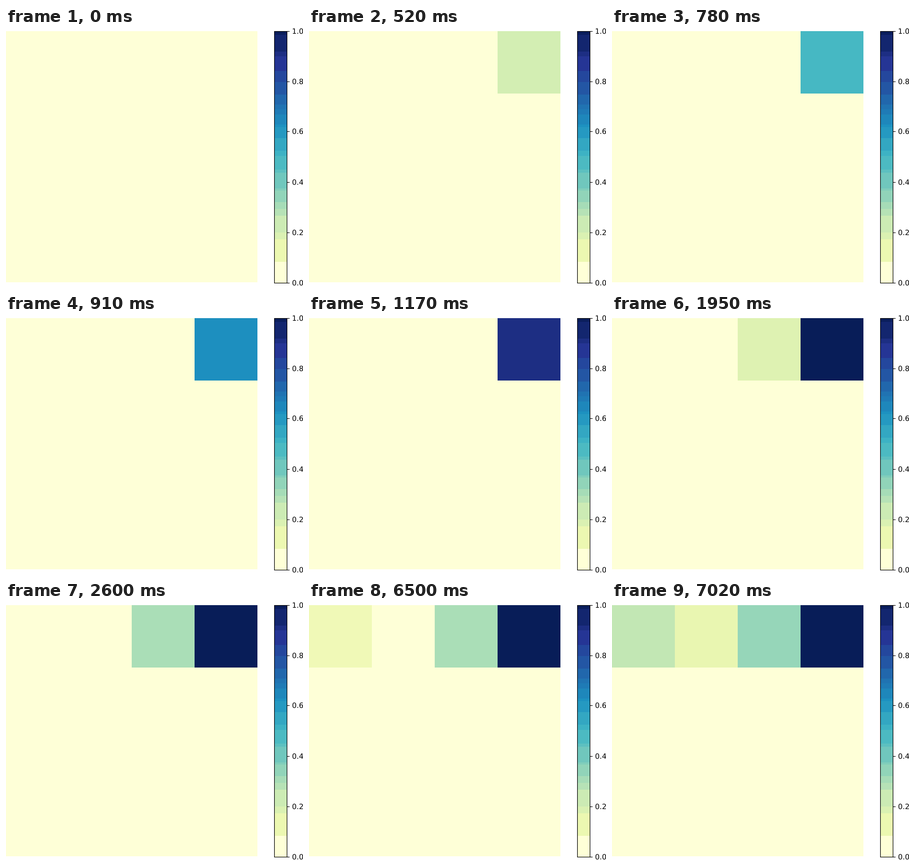
Write an HTML page that moves like this. It is 567 px wide and 494 px high and loops after 8000 ms.

```html
<!DOCTYPE html>
<html lang="en">
<head>
<meta charset="utf-8">
<title>Heatmap</title>
<style>
html, body { margin: 0; width: 100%; height: 100%; overflow: hidden; background: #fff; }
svg { display: block; width: 567px; height: 494px; }
text { font: 13.89px "DejaVu Sans", sans-serif; text-rendering: geometricPrecision; }
</style>
</head>
<body>
<svg id="stage" viewBox="0 0 567 494"></svg>
<script>
const LOOP = 8000, TOP = 6, BOTTOM = 486, CELL = 120;
const stage = document.getElementById("stage");

function add(tag, attrs, text) {
  const el = document.createElementNS("http://www.w3.org/2000/svg", tag);
  for (const key in attrs) el.setAttribute(key, attrs[key]);
  if (text) el.textContent = text;
  return stage.appendChild(el);
}

function rect(x, y, width, height, fill) {
  return add("rect", { x, y, width, height, fill, "shape-rendering": "crispEdges" });
}

// Yellow-green-blue colour scale, evenly spaced stops
const stops = ["feffd7", "edf8b1", "c7e9b4", "7fcdbb", "41b6c4", "1d91c0", "225ea8", "253494", "081d58"]
  .map(hex => [0, 2, 4].map(i => parseInt(hex.slice(i, i + 2), 16)));

function scale(value) {
  const pos = value * 8;
  const i = Math.min(7, Math.floor(pos));
  const mix = stops[i].map((c, k) => Math.round(c + (stops[i + 1][k] - c) * (pos - i)));
  return `rgb(${mix})`;
}

const clamp = (x, low, high) => Math.min(high, Math.max(low, x));

// Whole steps completed since start, one per interval
const count = (t, start, interval) => Math.max(0, Math.floor((t - start) / interval) + 1);

// Values of the top row, from left to right
const values = [
  t => t < 6500 ? 0 : 0.03 + 0.076 * Math.min(3, count(t, 6500, 260)),
  t => t < 6760 ? 0 : 0.138,
  t => {
    const level = [1300, 1950, 2340, 2600].filter(start => t >= start).length;
    return level && 0.05 + 0.0625 * level + (t < 6760 ? 0 : 0.035);
  },
  t => clamp(0.14 * count(t, 390, 130) - 0.07, 0, 1)
];

rect(0, TOP, 4 * CELL, 479, scale(0));
const cells = values.map((_, i) => rect(i * CELL, TOP, CELL, 119, scale(0)));

// Colour bar: uneven bands, each coloured by the value at its middle
const heights = [7, 32, 9, 28, 21, 24, 19, 9, 10, 19, 5, 21, 24, 10, 26, 6, 30, 4, 22, 13, 13, 32, 13, 43];
let y = TOP;
for (const h of heights) {
  rect(512, y, 24, h, scale((BOTTOM - y - h / 2) / 480));
  y += h;
}
rect(512, y, 24, BOTTOM - y, scale(0));
add("rect", { x: 512.5, y: 6.5, width: 24, height: 480, fill: "none", stroke: "#000", "stroke-width": 1.11 });

for (let i = 0; i <= 5; i++) {
  const value = i * 0.2;
  const tickY = Math.round(485.5 - 480 * value);
  add("path", { d: `M536.5 ${tickY + 0.5}H541.4`, stroke: "#000", "stroke-width": 1.11 });
  add("text", { x: 546, y: tickY + 5 }, value.toFixed(1));
}

function draw(t) {
  cells.forEach((cell, i) => cell.setAttribute("fill", scale(values[i](t))));
}

const begin = performance.now();
function tick() {
  draw((performance.now() - begin) % LOOP);
  requestAnimationFrame(tick);
}
draw(0);
requestAnimationFrame(tick);
</script>
</body>
</html>
```
